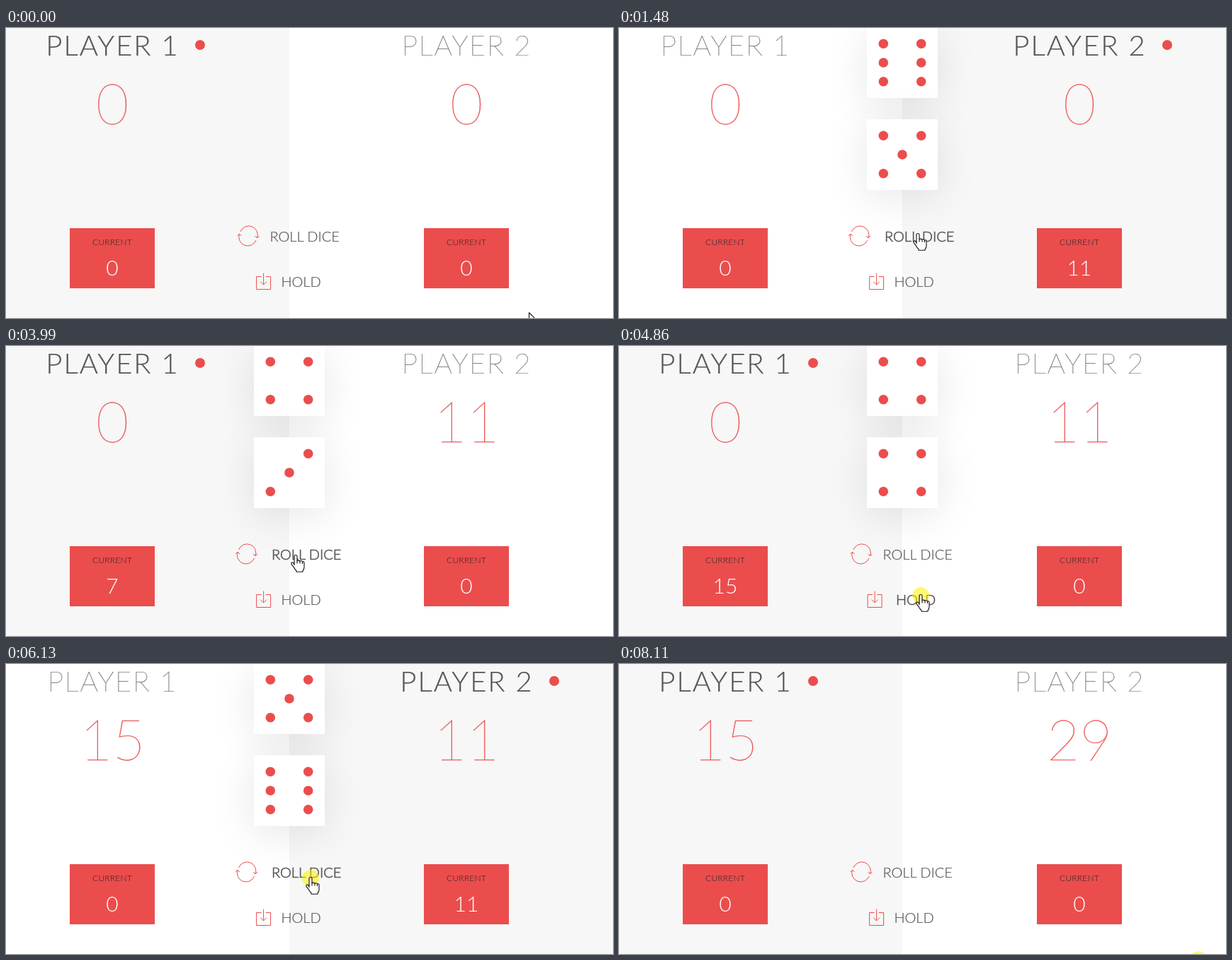
Write an HTML page that moves like this. It is 857 px wide and 410 px high and loops after 8260 ms.

```html
<!DOCTYPE html>
<html lang="en">
<head>
<meta charset="utf-8">
<title>Dice game</title>
<style>
  html, body { margin: 0; width: 100%; height: 100%; overflow: hidden; background: #fff; }
  #stage { position: relative; width: 857px; height: 410px; overflow: hidden; }
  .panel { position: absolute; top: 0; height: 410px; }
  #left { left: 0; width: 400px; }
  #right { left: 400px; width: 457px; }
  .panel.active { background: #f6f7f6; }
  .die { position: absolute; left: 350px; width: 100px; height: 100px; background: #fff;
         box-shadow: 0 10px 60px rgba(0, 0, 0, .1); }
  svg { position: absolute; left: 0; top: 0; }
  text { font-family: Lato, sans-serif; font-weight: 300; fill: #555; }
  .mid { text-anchor: middle; }
  .name { font-size: 40px; font-weight: 100; letter-spacing: 1.7px; stroke: #555; stroke-width: .2px; }
  .score { font-size: 80px; font-weight: 100; fill: #eb4d4d; stroke: #eb4d4d; stroke-width: .3px; }
  .label { font-size: 12px; fill: #222; letter-spacing: .2px; }
  .current { font-size: 30px; fill: #fff; }
  .active .name { font-weight: 300; letter-spacing: 2px; }
  .player .dot { visibility: hidden; }
  .player.active .dot { visibility: visible; }
  .red { fill: #eb4d4d; }
  .button text { font-size: 20px; stroke: #555; stroke-width: .2px; }
  .icon { fill: none; stroke: #eb4d4d; stroke-width: 1; }
  .button.hover text { stroke-width: .6px; transform: translateX(2.5px); }
  .button.hover .icon { transform: translateX(-2.5px); }
  .pointer { fill: #fff; stroke: #111; stroke-width: 1.1; stroke-linejoin: round; }
  .off { display: none; }
</style>
</head>
<body>
<div id="stage">
  <div id="left" class="panel"></div>
  <div id="right" class="panel"></div>
  <div class="die" style="top:-1px"></div>
  <div class="die" style="top:129px"></div>
  <svg width="857" height="410" viewBox="0 0 857 410">
    <g id="players"></g>
    <g id="pips"></g>
    <g class="button" id="roll">
      <path class="icon" d="M331 288A12.5 12.5 0 0 1 354.5 297M351.6 294l2.9 3 2.9-3M329.6 291A12.5 12.5 0 0 0 353 300M326.7 294l2.9-3 2.9 3"/>
      <text x="372.4" y="302">ROLL DICE</text>
    </g>
    <g class="button" id="hold">
      <path class="icon" d="M360.5 351.5H353.6V369.5H373.6V351.5H366.7M363.6 346.5V363M359.2 358.6l4.4 4.4 4.4-4.4"/>
      <text x="388.4" y="366">HOLD</text>
    </g>
    <g id="cursor">
      <circle id="press" r="12" fill="#fff200" fill-opacity=".55"/>
      <path id="arrow" class="pointer" d="M.5 .5V17l4-3.7 2.6 6 2.4-1-2.6-6H12.5z"/>
      <g id="hand" class="pointer" transform="translate(0 -1.5)">
        <path d="M-2 14V2a2 2 0 0 1 4 0v6q2-1 4 .5 2-.8 3.5 .8 2.5-.5 2.5 2v6q0 3-2 5v1.5h-9v-1.5q-2-1.5-4-5.5l-3-4q-.5-2 1-2.3 2-.2 3 3z"/>
        <path d="M2 8v4M6 8.5v3.5M9.5 9.5v3"/>
      </g>
    </g>
  </svg>
</div>
<script>
  const LOOP = 8260, TICK = 80, TRAVEL = 480;
  const $ = id => document.getElementById(id);

  // The cursor sets off, then clicks at a point; rolls also carry the two dice.
  const clicks = [
    { from: 70, at: 390, x: 422, y: 292, dice: [1, 3] },
    { from: 1320, at: 1320, x: 422, y: 292, dice: [6, 5] },
    { from: 2720, at: 3280, x: 420, y: 369 },
    { from: 3510, at: 3910, x: 409, y: 297, dice: [4, 3] },
    { from: 4310, at: 4310, x: 409, y: 297, dice: [4, 4] },
    { from: 4470, at: 4860, x: 426, y: 353 },
    { from: 5100, at: 5500, x: 430, y: 303, dice: [5, 6] },
    { from: 6130, at: 6130, x: 430, y: 303, dice: [4, 3] },
    { from: 6370, at: 7160, x: 424, y: 371 },
    { from: 7240, at: 8110, x: 818, y: 418 }
  ];

  function buttonAt(x, y) {
    if (Math.abs(x - 400) < 78 && Math.abs(y - 295) < 19) return 'roll';
    if (Math.abs(x - 400) < 55 && Math.abs(y - 359) < 19) return 'hold';
    return '';
  }

  function pass(game) {
    game.turn = 1 - game.turn;
    game.current = 0;
    game.dice = [0, 0];
  }

  const rules = {
    roll(game, dice) {
      if (dice.includes(1)) return pass(game);
      game.current += dice[0] + dice[1];
      game.dice = dice;
    },
    hold(game) {
      game.scores[game.turn] += game.current;
      pass(game);
    }
  };

  const ease = p => p * p * (3 - 2 * p);

  // Replay the game up to time t.
  function play(t) {
    const game = { turn: 0, scores: [0, 0], current: 0, dice: [0, 0], x: 738, y: 402, pressed: false };
    for (const { from, at, x, y, dice } of clicks) {
      if (t < from) break;
      const count = Math.max(1, Math.round(Math.min(TRAVEL, at - from) / TICK));
      const p = ease(Math.min(1, (Math.floor((t - from) / TICK) + 1) / count));
      game.x += (x - game.x) * p;
      game.y += (y - game.y) * p;
      if (t < at) break;
      const button = buttonAt(x, y);
      game.pressed = !button || t < at + TICK;
      if (game.pressed) break;
      rules[button](game, dice);
    }
    return game;
  }

  $('players').innerHTML = [0, 1].map(i => `
    <g class="player" transform="translate(${i * 500})">
      <text class="mid name" x="150.5" y="39">PLAYER ${i + 1}</text>
      <circle class="dot red" cx="274" cy="24" r="7"/>
      <text class="mid score" x="150.3" y="136"></text>
      <rect class="red" x="90" y="283" width="120" height="85"/>
      <text class="mid label" x="150" y="307">CURRENT</text>
      <text class="mid current" x="150" y="350"></text>
    </g>`).join('');

  // Whether a face n has a pip at column c, row r (each -1 to 1).
  const lit = (c, r, n) => !c ? !r && n % 2 === 1 : !r ? n === 6 : n > (c === r ? 3 : 1);

  const pips = [];
  for (let die = 0; die < 2; die++)
    for (let c = -1; c <= 1; c++)
      for (let r = -1; r <= 1; r++) {
        $('pips').insertAdjacentHTML('beforeend',
          `<circle class="red" cx="${400 + c * 26.7}" cy="${49 + die * 130 + r * 26.7}" r="6.8"/>`);
        pips.push({ die, c, r, el: $('pips').lastElementChild });
      }

  const panels = document.querySelectorAll('.panel');
  const players = document.querySelectorAll('.player');
  const dice = document.querySelectorAll('.die');
  const show = (el, on) => el.classList.toggle('off', !on);

  function draw(game) {
    players.forEach((el, i) => {
      const active = i === game.turn;
      el.classList.toggle('active', active);
      panels[i].classList.toggle('active', active);
      el.querySelector('.score').textContent = game.scores[i];
      el.querySelector('.current').textContent = active ? game.current : 0;
    });
    dice.forEach((el, i) => show(el, game.dice[i]));
    pips.forEach(({ die, c, r, el }) => show(el, lit(c, r, game.dice[die])));

    const x = Math.round(game.x), y = Math.round(game.y);
    const over = buttonAt(x, y);
    for (const id of ['roll', 'hold']) $(id).classList.toggle('hover', id === over);
    show($('hand'), over);
    show($('arrow'), !over);
    show($('press'), game.pressed);
    $('cursor').setAttribute('transform', `translate(${x} ${y})`);
  }

  function frame() {
    draw(play(performance.now() % LOOP));
    requestAnimationFrame(frame);
  }
  frame();
</script>
</body>
</html>
```
